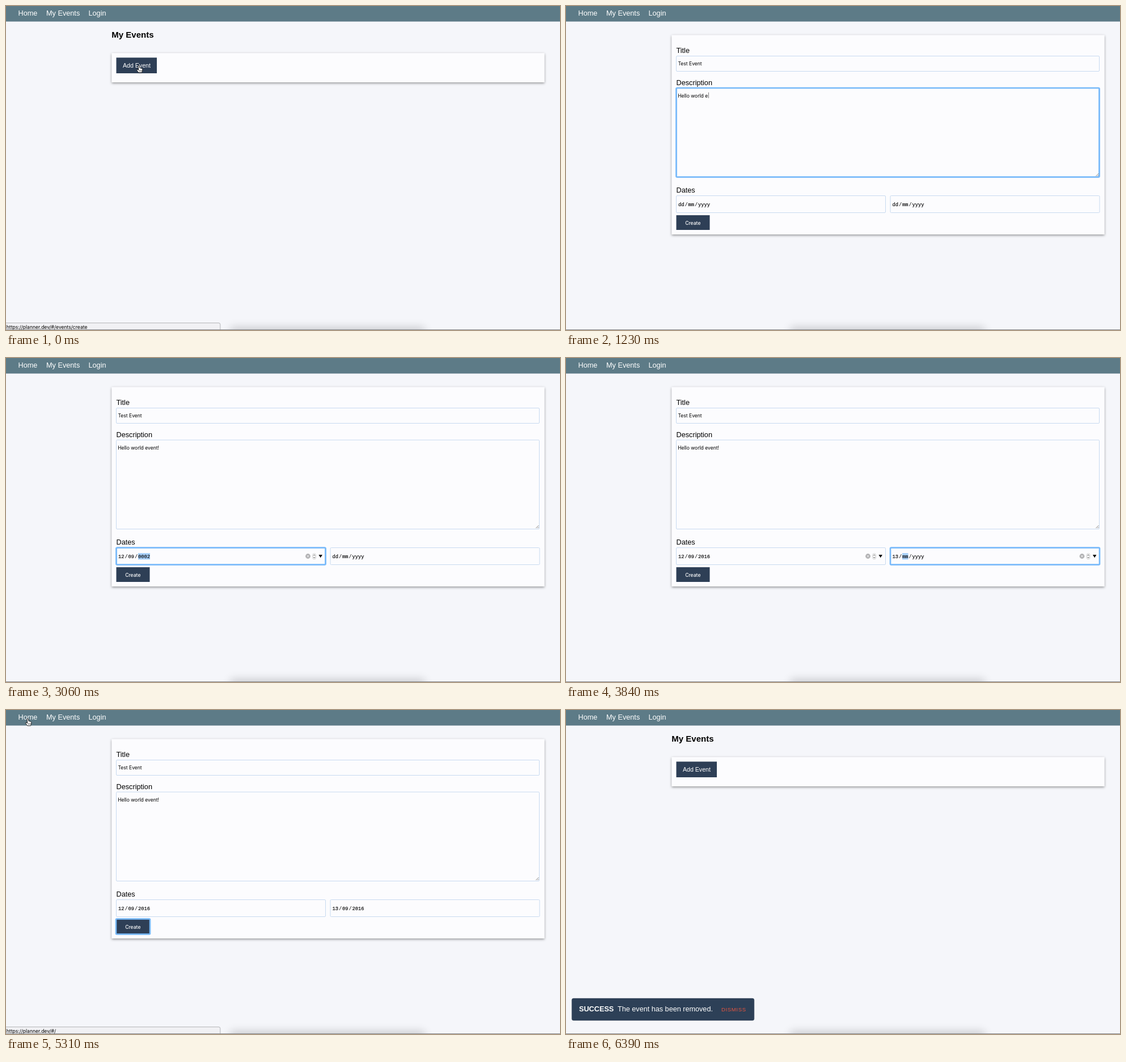
An HTML page for the animation above (6.45 s loop, 977 px wide and 573 px high).

```html
<!DOCTYPE html>
<html lang="en">
<head>
<meta charset="utf-8">
<title>Event planner</title>
<style>
  html, body { margin: 0; width: 100%; height: 100%; overflow: hidden; background: #f5f6fa; }
  svg { display: block; width: 977px; height: 573px; font-family: "Liberation Sans", Arial, sans-serif; }
  text { white-space: pre; }
  .ui { font-family: Inter, "Open Sans", sans-serif; }
  .mono { font-family: "Liberation Mono", "Courier New", monospace; }
</style>
</head>
<body>
<svg viewBox="0 0 977 573" xmlns="http://www.w3.org/2000/svg">
  <defs>
    <filter id="shadow" x="-5%" y="-20%" width="110%" height="150%">
      <feDropShadow dx="0" dy="1.6" stdDeviation="2.1" flood-color="#000" flood-opacity=".42"/>
    </filter>
    <filter id="blur" x="-20%" y="-200%" width="140%" height="500%"><feGaussianBlur stdDeviation="8"/></filter>
    <filter id="soft" x="-20%" y="-50%" width="140%" height="200%"><feGaussianBlur stdDeviation=".6"/></filter>
  </defs>
  <rect width="977" height="573" fill="#f5f6fa"/>
  <rect x="396" y="568" width="342" height="20" fill="#000" opacity=".17" filter="url(#blur)"/>
  <rect width="977" height="27.5" fill="#5d7b87"/>
  <g fill="#fff" font-size="12.7">
    <text x="21.5" y="17">Home</text><text x="71" y="17">My Events</text><text x="145.5" y="17">Login</text>
  </g>
  <g id="scene"></g>
  <rect y="572" width="977" height="1" fill="#85878b"/>
</svg>
<script>
const LOOP = 6450, STEP = 30;
const TITLE = 'Test Event', BODY = 'Hello world event!';
const HISTORY = ['Test CMS', 'Test Event', 't', 'Test'];
const NAVY = '#2e3f56', CARD = '#fcfcfe', BORDER = '#c8daf0';
const scene = document.getElementById('scene');

const clamp01 = v => Math.max(0, Math.min(1, v));
const progress = (t, from, to) => clamp01((t - from) / (to - from));
const ease = p => p * p * (3 - 2 * p);
const typed = (s, t, from, to) => s.slice(0, Math.floor(s.length * progress(t, from, to) + 1e-6));

const text = (x, y, s, size, fill = '#000', extra = '') =>
  `<text x="${x}" y="${y}" font-size="${size}" fill="${fill}" ${extra}>${s}</text>`;
const ui = (x, y, s, size = 8.55, fill = '#000', extra = '') => text(x, y, s, size, fill, `class="ui" ${extra}`);
const rect = (x, y, w, h, fill, extra = '') =>
  `<rect x="${x}" y="${y}" width="${w}" height="${h}" fill="${fill}" ${extra}/>`;
const path = (d, fill, extra = '') => `<path d="${d}" fill="${fill}" ${extra}/>`;
const card = (y, h) => rect(186.5, y, 763, h, CARD, 'filter="url(#shadow)"');
const ring = (x, y, w, h) =>
  rect(x, y, w, h, 'none', 'rx="1.5" stroke="#69b1f8" stroke-width="2.6" filter="url(#soft)"') +
  rect(x, y, w, h, 'none', 'rx="1.5" stroke="#7dbdfa" stroke-width="1.6"');

function field(x, y, w, h, focused) {
  return rect(x, y, w, h, CARD, `rx="1.5" stroke="${BORDER}"`) + (focused ? ring(x, y, w, h) : '');
}

// Value with a caret after it while focused
function inputText(x, y, s, focused) {
  const caret = focused ? '<tspan font-weight="300" dx="-.3" dy="-.5">|</tspan>' : '';
  return ui(x, y, s + caret);
}

function dateField(x, day, month, year, active, controls) {
  const parts = [[day || 'dd', 3.5, 10.5], [month || 'mm', 21, 10.5], [year || 'yyyy', 38.5, 21]];
  let out = field(x, 335.5, 369, 30, active >= 0);
  parts.forEach(([s, dx, w], i) => {
    if (i === active) out += rect(x + dx, 345, w, 11.5, '#a9d1fb');
    out += text(x + dx, 353.6, s, 8.75, '#000', 'class="mono" stroke="#000" stroke-width=".15"');
  });
  for (const dx of [14.9, 32.4]) out += text(x + dx, 353.6, '/', 8.75, '#000', 'class="mono"');
  if (!controls) return out;
  if (day) {
    out += `<circle cx="${x + 338}" cy="350.5" r="4.4" fill="#b2b2b4"/>` +
      path(`M${x + 336.3} 348.8l3.4 3.4m0-3.4l-3.4 3.4`, 'none', 'stroke="#fff"');
  }
  return out + rect(x + 346.3, 345.8, 5.6, 10, '#fff', 'rx="2.6" stroke="#b9b9bb" stroke-width=".7"') +
    path(`M${x + 347.6} 349.6l1.5-1.8 1.5 1.8M${x + 347.6} 352l1.5 1.8 1.5-1.8`, 'none', 'stroke="#444" stroke-width=".9"') +
    path(`M${x + 357} 348h6.4l-3.2 5.2z`, '#000');
}

function suggestions(value) {
  const hits = HISTORY.filter(s => s.toLowerCase().startsWith(value.toLowerCase()));
  if (!value || value === TITLE) return '';
  return rect(194.5, 116, 746, hits.length * 19 + 1, CARD, 'stroke="#9cc4ec"') +
    hits.map((s, i) => ui(201, 130.7 + i * 19, s, 10.1, '#000', 'font-weight="700"')).join('');
}

function formPage(t) {
  const title = t < 390 ? '' : 'T' + typed(TITLE.slice(1), t, 430, 630);
  const body = typed(BODY, t, 780, 1380);
  const inTitle = t >= 240 && t < 750, inBody = t >= 750 && t < 2070;
  const firstActive = t < 2070 || t >= 3450 ? -1 : t < 2490 ? 0 : t < 2850 ? 1 : 2;
  const secondActive = t < 3450 || t >= 4770 ? -1 : t < 3720 ? 0 : t < 4020 ? 1 : 2;
  const digits = (s, from, to) => {
    const v = typed(s, t, from, to);
    return v && v.padStart(s.length, '0');
  };
  return card(51.5, 352.5) +
    text(194.5, 83.2, 'Title', 12.7) + text(194.5, 139.6, 'Description', 12.7) + text(194.5, 330.2, 'Dates', 12.7) +
    field(194.5, 88.5, 746, 27, inTitle) + inputText(197.5, 105.4, title, inTitle) +
    field(194.5, 145, 746, 157.5, inBody) + inputText(197.2, 161.8, body, inBody) +
    path('M934.5 301l5-5m-2 5l2-2', 'none', 'stroke="#777" stroke-width=".9"') +
    dateField(194.5, digits('12', 2280, 2460), digits('09', 2640, 2820), digits('2016', 2970, 3300),
      firstActive, t >= 1980 && t < 4530) +
    dateField(572, digits('13', 3540, 3690), digits('09', 3870, 3990), digits('2016', 4080, 4320),
      secondActive, secondActive >= 0) +
    rect(194.5, 370, 59, 26, NAVY) + ui(223.8, 386.5, 'Create', 8.55, '#fff', 'text-anchor="middle" font-weight="500"') +
    (t >= 4770 ? ring(194, 369.5, 60, 27) : '') +
    (inTitle ? suggestions(title) : '');
}

function calendarIcon() {
  let out = rect(30.5, 190.5, 10, 9, 'none', 'rx=".8" stroke="#20252b"') + rect(30, 190, 11, 3, '#20252b');
  for (const x of [33.2, 35.6, 38]) out += rect(x, 193, .6, 6.5, '#20252b');
  for (const y of [195, 197.3]) out += rect(30.5, y, 10, .6, '#20252b');
  return out + rect(32.3, 188.7, 1.5, 2.6, '#20252b') + rect(37.2, 188.7, 1.5, 2.6, '#20252b');
}

function calendarPage() {
  return text(21.8, 76.2, 'Event Calendar', 25.4, '#000', 'font-weight="700"') +
    rect(22, 98, 358, 126, CARD, 'rx="2" stroke="#e4e5ea"') +
    text(30, 129.4, TITLE, 11.9, '#3c4c5a', 'font-weight="700"') +
    rect(30, 148, 342, 1, '#efeff2') +
    text(30, 172.2, BODY, 12.7, '#c1c1c4') +
    calendarIcon() + text(43.2, 198.6, '2016-09-12 - 2016-09-13', 11.1, '#33404d') +
    '<circle cx="34.5" cy="207.5" r="2.6" fill="#a9a9ad"/>' +
    path('M30 214.5v-2.2q0-2.6 2.4-2.8q2.1 1.3 4.2 0q2.4.2 2.4 2.8v2.2z', '#a9a9ad') +
    text(42, 213.7, 'Jordwen', 11.1, '#adadb1');
}

function eventsPage() {
  return text(186.3, 56.2, 'My Events', 15, '#000', 'font-weight="700"') + card(83.3, 51.7) +
    rect(194.5, 91.3, 71.5, 27.7, NAVY) + text(206, 109, 'Add Event', 10.6, '#fff');
}

function toast(t) {
  const p = ease(progress(t, 6180, 6330));
  if (!p) return '';
  return `<g transform="translate(${(p - 1) * 340} 0)" opacity="${p}">` +
    rect(10.3, 510, 321.5, 39, '#2d4057', 'rx="3" stroke="#26374b" stroke-width=".5"') +
    text(23, 533.4, 'SUCCESS', 12.7, '#fff', 'font-weight="700"') +
    text(91, 533.4, 'The event has been removed.', 12.65, '#fff') +
    text(274, 533.4, 'DISMISS', 9.5, '#e8543f', 'letter-spacing=".65"') + '</g>';
}

function status(t) {
  const route = t < 150 ? 'events/create' : t >= 5280 && t < 5490 ? '' : t >= 5610 && t < 5910 ? 'events' : null;
  if (route === null) return '';
  return path('M-1 560.5H375q2.8 0 2.8 2.8V573H-1z', '#f1f1f4', 'stroke="#b4b5b8"') +
    ui(.8, 570.6, 'https://planner.dev/#/' + route);
}

// Pointer moves: [start, end, from x, from y, to x, to y]
const MOVES = [
  [1470, 2010, 234, 106, 206.5, 346],
  [4410, 4740, 206.5, 346, 226, 380],
  [4950, 5280, 226, 380, 38, 15],
  [5490, 5610, 38, 15, 104, 15],
  [5880, 6120, 104, 15, 236, 122]
];

function pointer(t) {
  if ((t >= 360 && t < 1470) || (t >= 2250 && t < 4410) || t >= 6180) return '';
  let x = 234, y = 105;
  for (const [start, end, x0, y0, x1, y1] of MOVES) {
    if (t < start) break;
    const p = ease(progress(t, start, end));
    x = x0 + (x1 - x0) * p;
    y = y0 + (y1 - y0) * p;
  }
  const overLink = t < 150 || (t >= 5250 && t < 5910);
  const overText = (t >= 150 && t < 360) || (t >= 1470 && t < 1920);
  const at = `transform="translate(${x} ${y})"`;
  if (overLink) {
    return path('M-1 .8Q.2-.8 1.3 .8L2 4.7Q3.2 4 4 5.2Q5.2 4.8 5.7 5.9Q6.8 5.8 6.9 7.2L6.3 10.4 5.5 12.8H-.2L-3.2 8.8Q-3.7 7 -2 7.2L-.2 8.4z',
      '#fff', `${at} stroke="#111" stroke-width=".9" stroke-linejoin="round"`) +
      path('M1.4 8.2v2.8m1.8-2.8v2.8m1.8-2.8v2.8', 'none', `${at} stroke="#111" stroke-width=".6"`);
  }
  if (overText) return path('M-2-5q2 0 2 1.5v8q0 1.5-2 1.5M2-5q-2 0-2 1.5v8q0 1.5 2 1.5', 'none', `${at} stroke="#222" stroke-width=".8"`);
  return path('M0 0V11.2L2.5 8.8 4.4 13 6.3 12.2 4.5 8.1H8z', '#000', `${at} stroke="#fff" stroke-width=".9"`);
}

function page(t) {
  if (t >= 120 && t < 5430) return formPage(t);
  return t >= 5430 && t < 5850 ? calendarPage() : eventsPage();
}

let drawn = -1;
function draw(now) {
  const t = Math.floor((now % LOOP) / STEP) * STEP;
  if (t !== drawn) {
    drawn = t;
    scene.innerHTML = page(t) + toast(t) + status(t) + pointer(t);
  }
}

const begin = performance.now();
function tick() {
  draw(performance.now() - begin);
  requestAnimationFrame(tick);
}
tick();
</script>
</body>
</html>
```
